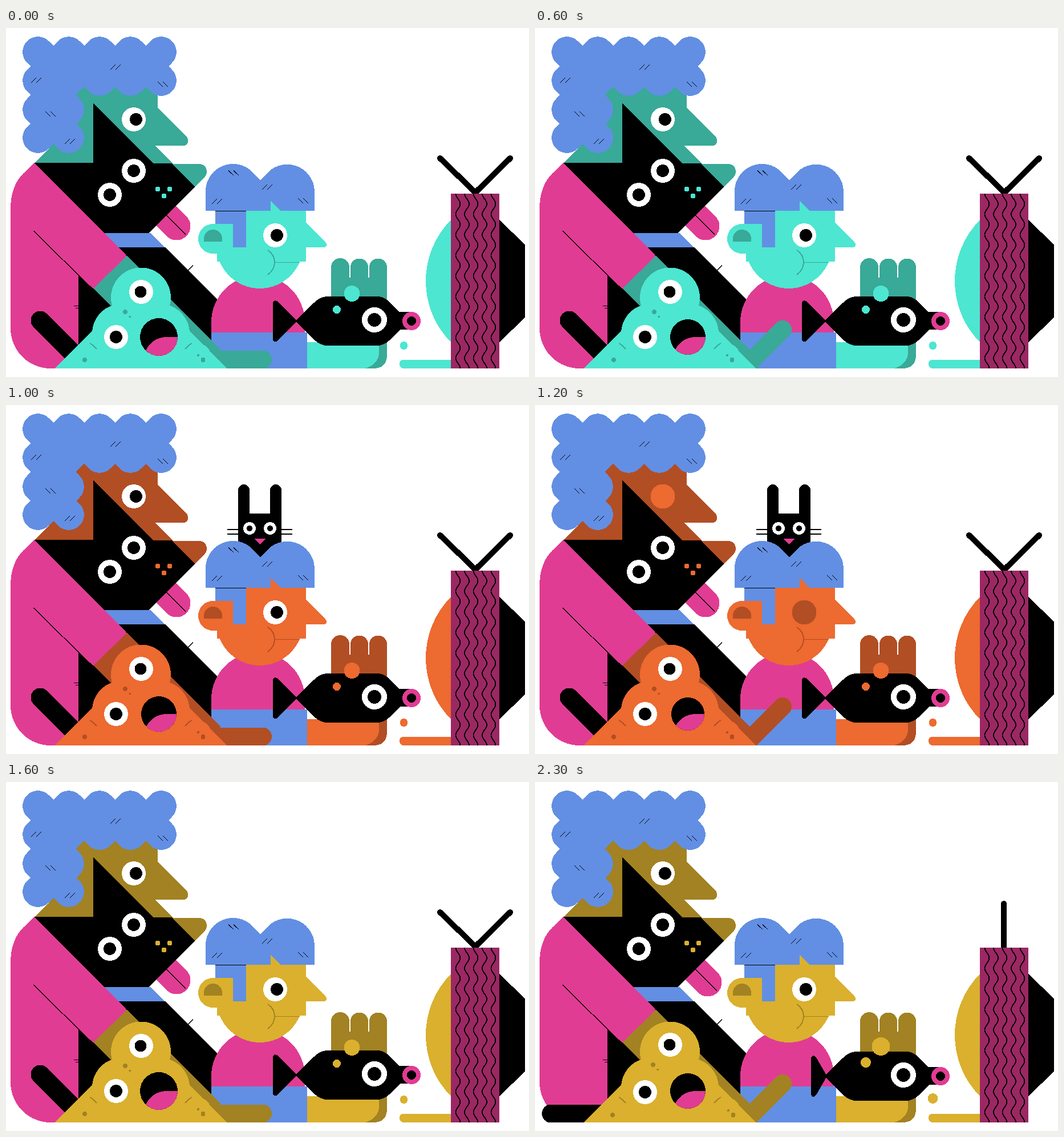
Write an HTML page that moves like this. It is 917x611 px and loops after 2400 ms.

```html
<!DOCTYPE html>
<html lang="en">
<head>
<meta charset="utf-8">
<title>Family by the TV</title>
<style>
html, body { margin: 0; width: 100%; height: 100%; overflow: hidden; background: #fff; }
svg { display: block; width: 917px; height: 611px; shape-rendering: crispEdges; --l: #4de6d1; --d: #39a998; }
.l { fill: var(--l); } .d { fill: var(--d); } .p { fill: #e13c93; } .b { fill: #628fe3; } .w { fill: #fff; }
.s { fill: none; stroke: #000; stroke-width: 1.9; }
.mark { fill: none; stroke: #000; stroke-width: 1.4; }
.thin { fill: none; stroke: var(--d); stroke-width: 1.9; }
.limb { fill: none; stroke: #000; stroke-linecap: round; }
.hand { stroke: var(--d); stroke-width: 32; }
.even .o, .odd .e, .raised .low, .lowered .high { display: none; }
.odd .up { transform: translateY(-2px); }
.odd .down { transform: translateY(2px); }
.odd .upLeft { transform: translate(-2px, -2px); }
.odd .downLeft { transform: translate(-2px, 2px); }
.odd .downRight { transform: translate(2px, 2px); }
.odd .tongue { transform: translate(4px, 4px); }
.odd .grow { stroke: var(--l); stroke-width: 4; }
.lid { display: none; }
.blink .lid { display: inline; }
</style>
</head>
<body>
<svg id="stage" viewBox="0 0 917 611">
  <defs>
    <clipPath id="mouthClip"><circle class="mouth" cx="268" cy="541" r="33"/></clipPath>
  </defs>

  <!-- television -->
  <path d="M865 336L910 379V507L865 550Z"/>
  <path class="l" d="M780 336A152 152 0 0 0 780 550Z"/>
  <path class="limb e" stroke-width="10" d="M761 228L823 288L884 228"/>
  <path class="limb o" stroke-width="10" d="M822 290V213"/>
  <path fill="#9b2863" d="M780 290H865V596H780Z"/>
  <path class="s" id="waves"/>
  <path class="l" d="M780 581H697Q690 581 690 588T697 596H780Z"/>
  <circle class="l up grow" cx="697.5" cy="556" r="7"/>

  <!-- woman -->
  <path class="d" d="M50 236L120 166V100H266V140L316 189Q319 192 319 198Q319 206 311 206H262L293 238H339Q352 239 352 252Q352 257 349 260L325 284L200 300Z"/>
  <path class="b" d="M43 67L37 61A26 26 0 0 1 75 23l8 8 8-8a27 27 0 0 1 38 0l8 8 8-8a27 27 0 0 1 38 0l8 8 8-8a27 27 0 0 1 38 0l8 8 8-8A26 26 0 0 1 291 61l-6 6 6 6A26 26 0 0 1 253 111l-8-8-8 8a27 27 0 0 1-38 0l-8-8-8 8a27 27 0 0 1-38 0l-8-8L122 117L129 124A27 27 0 0 1 129 162l-6 6 6 5A26 26 0 0 1 91 211l-8-8-8 8A26 26 0 0 1 37 173l6-6-6-5A27 27 0 0 1 37 124l6-7-6-6A27 27 0 0 1 37 73Z"/>
  <path class="mark" d="M44 96l9-9m0 9l9-9M183 73l9-9m0 9l9-9M266 94l9 9m0-9l9 9M69 146l9 9m0-9l9 9M103 203l9-9m0 9l9-9"/>
  <circle class="w" cx="224" cy="160" r="21"/><circle cx="228" cy="160" r="11"/>
  <circle class="l lid" cx="224" cy="160" r="21.5"/>

  <!-- cat -->
  <g class="tongue">
    <path class="limb" style="stroke:#e13c93" stroke-width="49" d="M268 316L299 347"/>
    <path class="mark" d="M278 324L315 362"/>
  </g>
  <path d="M153 132L258 237H290L331 278L250 359H170L50 236H153Z"/>
  <path d="M185 384H279L385 490V590Z"/>
  <path class="b" d="M165 359H253L279 384H185Z"/>
  <path class="mark" d="M319 424L328 416"/>
  <circle class="w" cx="224" cy="250" r="21"/><circle cx="224" cy="250" r="11"/>
  <circle class="w" cx="182" cy="292" r="21"/><circle cx="182" cy="292" r="11"/>
  <g class="l"><circle cx="266" cy="282" r="4.5"/><circle cx="287" cy="282" r="4.5"/><circle cx="277" cy="294" r="4.5"/></g>

  <!-- boy, with the rabbit behind his hair -->
  <g id="rabbit">
    <path d="M407 330V149a10 10 0 0 1 20 0V190H463V149a10 10 0 0 1 20 0V330Z"/>
    <path class="s" d="M388 218H407M388 226H407M483 218H502M483 226H502"/>
    <circle class="w" cx="427" cy="216" r="11"/><circle cx="427" cy="216" r="5"/>
    <circle class="w" cx="463" cy="216" r="11"/><circle cx="463" cy="216" r="5"/>
    <path class="p" d="M435 234H455L445 244Z"/>
  </g>
  <path class="p" d="M360 534V515A82 82 0 0 1 524 515V534Z"/>
  <path class="b" d="M360 533H528V596H360Z"/>
  <circle class="l" cx="445" cy="380" r="76"/>
  <path class="l" d="M370 318H526V340L560 375Q562 377 562 380T558 384H526V409H370Z"/>
  <path class="l" d="M398 343H363a26 26 0 0 0 0 52H398Z"/>
  <path class="d" d="M347 374V369a16 16 0 0 1 32 0V374Z"/>
  <path class="b" d="M350 320V285A48 48 0 0 1 432 252l14 15 14-15A48 48 0 0 1 541 285V320Z"/>
  <path class="b" d="M367 320H421V384H398V343H367Z"/>
  <path class="l" d="M464 302L482 321H464Z"/>
  <path class="s" d="M367 320.5H421"/>
  <path class="mark" d="M390 249l9 9m0-9l9 9M449 283l9-9m0 9l9-9M361 308l9-9m0 9l9-9M512 298l9 9m0-9l9 9"/>
  <circle class="w" cx="472" cy="363" r="21"/><circle cx="475" cy="363" r="11"/>
  <circle class="d lid" cx="472" cy="363" r="21.5"/>
  <path class="thin" d="M459 389Q471 397 471 410T459 432M471 410.5H515"/>

  <!-- foot and fish -->
  <path class="d" d="M570 560V419a16 16 0 0 1 32 0V437H604V419a15.5 15.5 0 0 1 31 0V437H637V419a15.5 15.5 0 0 1 31 0V572Q668 596 644 596H570Z"/>
  <path class="l" d="M528 550H654V568Q654 588 630 596H528Z"/>
  <path class="e" d="M468 481Q470 475 477 479L510 513L477 547Q470 553 468 545Z"/>
  <path class="o" d="M484 483Q487 476 493 482L512 515L493 548Q487 555 484 547Z"/>
  <g class="down">
    <path d="M685 497H708V528H685Z"/>
    <path d="M507 513L540 481Q551 470 564 470H651Q661 470 668 476L691 498V528L672 547Q663 556 650 556H564Q552 556 543 548Z"/>
    <circle class="w" cx="646" cy="511" r="22"/><circle cx="646" cy="511" r="12"/>
    <circle class="p" cx="711" cy="513" r="16"/><circle cx="711" cy="513" r="8"/>
  </g>
  <circle class="l up grow" cx="606.5" cy="465" r="14"/>
  <circle class="l up grow" cx="580" cy="493" r="7"/>

  <!-- woman's body, arm and the cat's hind part -->
  <path d="M127 420L215 500V570H127Z"/>
  <path class="p" d="M50 236L212 399L153 456L127 434V596H78A70 70 0 0 1 8 526V317Q8 276 31 254Z"/>
  <path class="limb e" stroke-width="33" d="M60 512L144 596"/>
  <path class="limb o" stroke-width="32" d="M28 580.5H130"/>
  <path class="mark" d="M48 355L153 458"/>
  <path class="s" d="M119 486.5H130M122 490.5H130"/>
  <path class="d" d="M212 399L376 563L360 596H293L153 456Z"/>
  <path class="limb hand low" d="M355 580.5H450"/>
  <path class="limb hand high" d="M366 596L434 528"/>

  <!-- three-lobed creature -->
  <g class="l">
    <path d="M85 596L236 445L388 596Z"/>
    <circle cx="236.5" cy="472" r="52.5"/>
    <circle cx="203" cy="535" r="52"/><circle cx="270" cy="535" r="52"/>
    <circle cx="141" cy="576" r="24"/><circle cx="336" cy="576" r="24"/>
  </g>
  <path class="thin" d="M147 552Q153 555 159 562M326 552Q320 555 314 562"/>
  <g class="up"><circle class="w" cx="237" cy="462" r="21"/><circle cx="236" cy="462" r="10.5"/></g>
  <g class="down"><circle class="w" cx="193" cy="541" r="21"/><circle cx="193" cy="541" r="11"/></g>
  <g class="d">
    <g class="upLeft"><circle cx="209" cy="497" r="4"/><circle cx="217.5" cy="505.5" r="2"/></g>
    <circle class="downLeft" cx="138" cy="581" r="4"/>
    <g class="downRight"><circle cx="337" cy="573" r="2"/><circle cx="345.5" cy="581" r="4"/></g>
  </g>
  <circle class="mouth" cx="268" cy="541" r="33"/>
  <path class="p" clip-path="url(#mouthClip)" d="M242 575A40 40 0 0 1 281 541H305V580H242Z"/>

  <path class="w" d="M0 596H917V611H0Z"/>
</svg>
<script>
const stage = document.getElementById('stage');
const rabbit = document.getElementById('rabbit');
const mouths = document.querySelectorAll('.mouth');
const skins = [['#4de6d1', '#39a998'], ['#ed6a30', '#b24e24'], ['#dab02e', '#a28222']];
const mouthSizes = [33, 33, 31, 31, 29, 29, 31, 31];
const rabbitDrops = [61, 0, -38, 0, -38, 0, 61]; // hops from step 9 to 15

let waves = '';
for (let x = 792.5; x < 860; x += 15.5) {
  for (let y = 290; y <= 596; y += 2) {
    const dx = -4 * Math.cos((y - 290) / 36 * 2 * Math.PI);
    waves += `${y === 290 ? 'M' : 'L'}${(x + dx).toFixed(1)} ${y}`;
  }
}
document.getElementById('waves').setAttribute('d', waves);

function draw() {
  const step = Math.floor(performance.now() % 2400 / 100);
  const phase = step % 8;
  const [light, dark] = skins[Math.floor(step / 8)];
  stage.style.setProperty('--l', light);
  stage.style.setProperty('--d', dark);
  stage.setAttribute('class', [
    step % 2 ? 'odd' : 'even',
    phase < 4 ? 'lowered' : 'raised',
    step === 12 || step === 13 ? 'blink' : ''
  ].join(' '));
  mouths.forEach(m => m.setAttribute('r', mouthSizes[phase]));
  const drop = rabbitDrops[step - 9];
  rabbit.style.display = drop === undefined ? 'none' : 'inline';
  rabbit.setAttribute('transform', `translate(0 ${drop ?? 0})`);
  requestAnimationFrame(draw);
}
draw();
</script>
</body>
</html>
```
